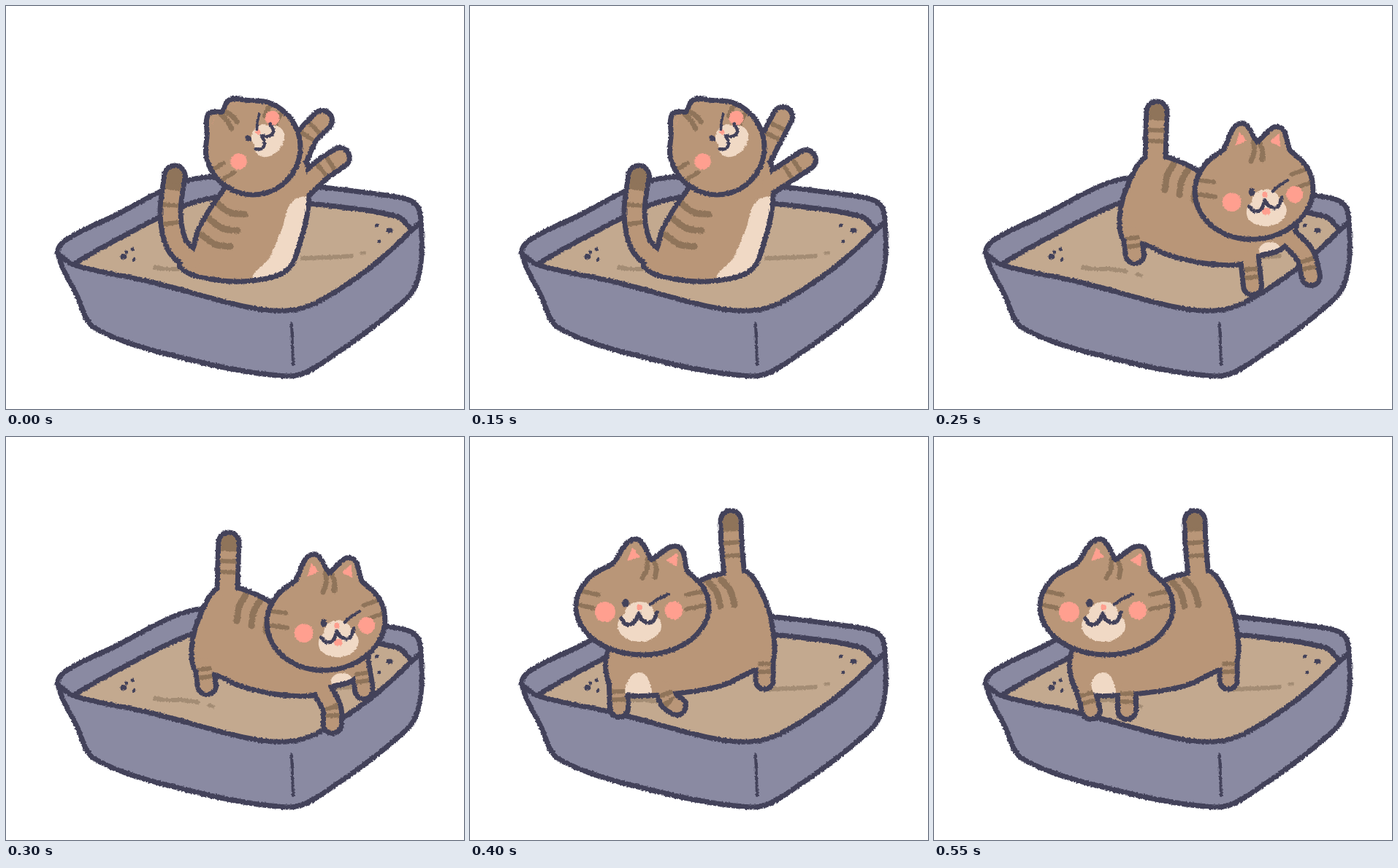
An HTML page with a canvas for the animation above (600 ms loop, 627 px wide and 553 px high).

```html
<!DOCTYPE html>
<html lang="en">
<head>
<meta charset="utf-8">
<title>Cat in a litter box</title>
<style>
  html, body { margin: 0; width: 100%; height: 100%; overflow: hidden; background: #fff; }
  canvas { display: block; filter: url(#rough); }
  svg { position: absolute; }
</style>
</head>
<body>
<canvas id="stage" width="627" height="553"></canvas>
<svg width="0" height="0">
  <filter id="rough" x="0" y="0" width="1" height="1" color-interpolation-filters="sRGB">
    <feTurbulence type="fractalNoise" baseFrequency="0.4" numOctaves="1" seed="4"/>
    <feDisplacementMap in="SourceGraphic" scale="4" xChannelSelector="R" yChannelSelector="G"/>
  </filter>
</svg>
<script>
const ctx = document.getElementById('stage').getContext('2d');
const INK = '#43425a', TRAY = '#8a8aa2', SAND = '#c3a98f', MARK = '#a38c74',
      FUR = '#b99678', STRIPE = '#8f745a', PINK = '#ff9f8f', CREAM = '#f0d9c5';
const PEN = 7;
ctx.lineJoin = 'round';

// "x,y x,y! ..." to points; "!" marks a sharp corner.
const parse = text => text.split(' ').flatMap(word => {
  const p = word.replace('!', '').split(',').map(Number);
  return word.endsWith('!') ? [p, p] : [p];
});

// Smooth curve through points, with handles a third of each span.
function trace(shape, closed) {
  const pts = typeof shape === 'string' ? parse(shape) : shape, n = pts.length;
  const at = i => closed ? pts[(i + n) % n] : pts[Math.max(0, Math.min(n - 1, i))];
  const handle = (from, to, size) => {
    const dx = to[0] - from[0], dy = to[1] - from[1], k = size / 3 / (Math.hypot(dx, dy) || 1);
    return [dx * k, dy * k];
  };
  ctx.beginPath();
  ctx.moveTo(...pts[0]);
  for (let i = 0; i < (closed ? n : n - 1); i++) {
    const b = at(i), c = at(i + 1), size = Math.hypot(c[0] - b[0], c[1] - b[1]);
    const h = handle(at(i - 1), c, size), g = handle(b, at(i + 2), size);
    ctx.bezierCurveTo(b[0] + h[0], b[1] + h[1], c[0] - g[0], c[1] - g[1], ...c);
  }
  if (closed) ctx.closePath();
}

function fill(shape, color) {
  trace(shape, true);
  ctx.fillStyle = color;
  ctx.fill();
}

function line(shape, color = INK, width = PEN, cap = 'round', closed = false) {
  trace(shape, closed);
  ctx.lineCap = cap;
  ctx.strokeStyle = color;
  ctx.lineWidth = width;
  ctx.stroke();
}

function oval(color, x, y, rx, ry = rx) {
  ctx.beginPath();
  ctx.ellipse(x, y, rx, ry, 0, 0, 7);
  ctx.fillStyle = color;
  ctx.fill();
}

// Filled, outlined shape whose details stay inside the outline.
function outlined(shape, details) {
  fill(shape, FUR);
  ctx.save();
  ctx.clip();
  details();
  ctx.restore();
  line(shape, INK, PEN, 'round', true);
}

// A limb is a thick line, listed from its tip, with two bands across it.
const leg = (path, width = 25, gap = 11) => ({ path, width, bands: [0, gap * .8, 6, gap - 6, 6, 999] });
const tail = (path, gap) => ({ path, width: 28, bands: [gap * .8, gap * .7, 6, gap - 6, 6, 999], dark: true });

function figure(body, limbs, details) {
  limbs.forEach(l => line(l.path, INK, l.width + PEN));
  outlined(body, details);
  limbs.forEach(({ path, width, bands, dark }) => {
    const inner = width - PEN;
    line(path, FUR, inner);
    ctx.setLineDash(bands);
    line(path, STRIPE, inner, 'butt');
    ctx.setLineDash([]);
    if (dark) oval(STRIPE, ...parse(path)[0], inner / 2);
  });
}

function backStripes(x, y, dx, dy, bend, end) {
  for (let i = 0; i < 3; i++) {
    const sx = x + dx * i, sy = y + dy * i;
    line([[sx, sy], [sx + bend[0], sy + bend[1]], [sx + end[0], sy + end[1]]], STRIPE, 9);
  }
}

// Ellipse with two ears; angles run clockwise from the crown.
function head(x, y, rx, ry, turn, ear) {
  const place = (u, v) => [
    x + u * rx * Math.cos(turn) - v * ry * Math.sin(turn),
    y + u * rx * Math.sin(turn) + v * ry * Math.cos(turn)];
  const polar = (angle, r) => place(Math.sin(angle) * r, -Math.cos(angle) * r);
  const start = .74, end = 2 * Math.PI - .46, steps = 12;
  const skull = Array.from({ length: steps + 1 }, (_, i) => polar(start + (end - start) * i / steps, 1));
  const valley = polar(.14, .99);
  const shape = [skull[0], ...skull, skull[steps], polar(-.08, ear), valley, valley, polar(.4, ear - .05)];

  outlined(shape, () => {
    for (const [angle, side] of [[-.08, -1], [.4, 1]]) {
      const tip = polar(angle + side * .04, ear - .17);
      const outer = polar(angle + side * .16, .98), inner = polar(angle - side * .05, 1.03);
      fill([tip, tip, outer, outer, inner, inner], PINK);
    }
    line([place(.08, -1), place(.07, -.8), place(0, -.6)], STRIPE, 7);
    line([place(.17, -.97), place(.21, -.8), place(.19, -.61)], STRIPE, 7);
    for (const side of [-1, 1])
      for (const v of [-.35, -.05])
        line([place(side, v), place(side * .66, v + .1)], STRIPE, 6);
  });
}

// Face around the nose; look slides cheeks and wink sideways.
function face(x, y, turn, size, look) {
  ctx.save();
  ctx.translate(x, y);
  ctx.rotate(turn);
  ctx.scale(size, size);
  oval(PINK, look - 47, 6, 14);
  oval(PINK, look + 47, 4, 12.5);
  oval(CREAM, 0, 25, 30, 22);
  oval(CREAM, 0, 8, 20, 16);
  oval(PINK, 0, 0, 4);
  oval(INK, -19, -6, 4.7, 6);
  line([[look + 15, -4], [look + 26, -12], [look + 39, -18]], INK, 4.5);
  line('-25,15 -18,23 -7,20 -1,8! 5,18 17,20 24,7', INK, 5.5);
  ctx.restore();
}

function tray() {
  const rim = '70,339 92,355 200,379 330,413 385,418 425,407 500,358 567,297';
  const back = '94,353 145,324 247,273 300,262 425,272 536,289 555,307';
  const body = '71,339 82,321 150,287 240,242 300,234 410,246 540,263 562,273 568,295 ' +
    '567,360 550,400 425,495 385,508 250,485 122,442 97,397';
  fill(body, TRAY);
  fill([...parse(back), ...parse(rim).slice(1).reverse()], SAND);
  line(back);
  line(rim);
  line(body, INK, PEN, 'round', true);
  line('391,436 393,492', INK, 4);
  line('204,359 222,361 240,361 262,364', MARK, 6);
  line('278,368 284,370', MARK, 5);
  line('406,346 440,345 473,343', MARK, 6);
  line('487,339 491,339', MARK, 5);
  for (const [x, y] of [[161, 344], [525, 308]]) oval(INK, x, y, 4.5, 3.8);
  for (const [x, y] of [[173, 334], [175, 348], [165, 338], [508, 301], [511, 323]]) oval(INK, x, y, 2.4);
}

function reaching(alt) {
  const arms = alt ? ['428,152 400,206', '460,211 410,244'] : ['433,157 413,178 400,206', '457,208 432,225 408,248'];
  figure('292,260 264,305 254,338 238,358 288,376 345,376 385,362 401,330 415,262 405,205 350,190',
    [tail('231,233 225,285 234,328 256,350', 25), ...arms.map(path => leg(path, 27, 15))], () => {
      backStripes(288, 270, -10, 22, [18, 13], [39, 16]);
      fill('415,265 391,269 378,305 361,345 340,376 390,365 410,320', CREAM);
    });
  head(338, 194, 65, 65, -.85, 1.17);
  face(345, 173, -.89, .8, -13);
}

function leaning(alt) {
  const front = alt ? ['436,384 432,345', '516,371 508,342 484,316'] : ['447,394 446,372 432,345', '490,347 484,310'];
  figure('292,206 330,211 370,230 490,285 495,310 475,334 446,343 418,355 370,353 322,342 285,326 262,325 254,290 266,244',
    [tail('305,145 304,172 303,210', 15), leg('275,341 271,312'), ...front.map(path => leg(path))], () => {
      backStripes(328, 217, 20, 7, [-9, 16], [-12, 35]);
      oval(CREAM, 460, 335, 15, 11);
    });
  head(438, 253, 81, 67, -.1, 1.4);
  face(453, 259, -.1, .92, -3);
  oval(PINK, 455, 282, 6, 5);
}

function walking(alt) {
  const front = alt ? ['215,375 206,342', '264,375 264,345'] : ['204,372 203,342', '283,369 273,362 266,344'];
  figure('347,187 377,184 400,215 414,260 413,312 387,321 345,341 282,352 219,355 193,345 190,292 240,250 318,196',
    [tail('357,115 358,145 362,192', 18), leg('403,334 403,300', 24), ...front.map(path => leg(path))], () => {
      backStripes(306, 200, 19, -2, [12, 14], [18, 34]);
      fill('215,358 217,333 230,323 243,330 246,358', CREAM);
    });
  head(236, 233, 91, 66, 0, 1.41);
  face(232, 234, 0, 1, 0);
}

const poses = [reaching, leaning, walking];

function draw(now) {
  const step = Math.floor(now / 50) % 12;
  ctx.fillStyle = '#fff';
  ctx.fillRect(0, 0, 627, 553);
  tray();
  poses[Math.floor(step / 4)](step % 2 === 1);
  requestAnimationFrame(draw);
}
draw(0);
</script>
</body>
</html>
```
